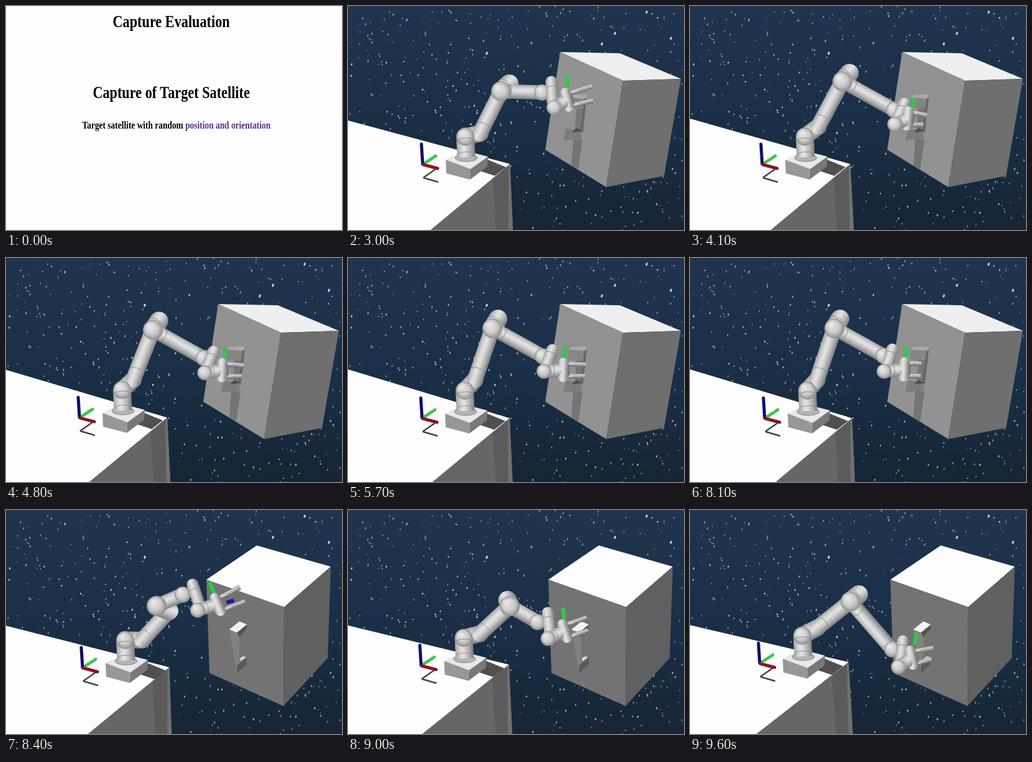
An HTML page with a canvas that plays this animation: 540 by 360 pixels, repeating every 9700 ms.

```html
<!DOCTYPE html>
<html lang="en">
<head>
<meta charset="utf-8">
<title>Capture Evaluation</title>
<style>
html, body { margin: 0; width: 100%; height: 100%; overflow: hidden; background: #fefefe; }
canvas, svg { position: absolute; left: 0; top: 0; width: 540px; height: 360px; display: block; }
text { font: bold 26.4px "Liberation Serif", "Times New Roman", serif; text-anchor: middle; }
.small { font-size: 15.9px; }
</style>
</head>
<body>
<canvas id="stage" width="540" height="360"></canvas>
<svg id="slide" viewBox="0 0 640 360" preserveAspectRatio="none">
  <rect width="640" height="360" fill="#fefefe"/>
  <rect x=".5" y=".5" width="639" height="359" fill="none" stroke="#ececec"/>
  <text x="314.8" y="34">Capture Evaluation</text>
  <text x="314.8" y="148">Capture of Target Satellite</text>
  <text class="small" x="324.6" y="197">Target satellite with random <tspan fill="#5b2c91">position and orientation</tspan></text>
</svg>
<script>
const LOOP = 9700, STEP = 100, INTRO = 3000, CUT = 8400;
const slide = document.getElementById('slide');
const ctx = document.getElementById('stage').getContext('2d');

// Joint positions; base is the platform drift, rim its left edge and bottom corner.
const ready = {
  base: [0, 0], rim: [184, 133], side: [212, 205], elbow: [246, 137], cap: [259, 125],
  wrist: [312, 139], w2a: [327, 122], w2b: [329, 154], w3: [331, 163],
  grip: [354, 150], tipA: [392, 129], tipB: [394, 152], marker: [352, 112]
};
const reach = {
  base: [-4, 0], rim: [181, 130], side: [206, 194], elbow: [245, 121], cap: [256, 108],
  wrist: [328, 167], w2a: [344, 157], w2b: [334, 180], w3: [329, 190],
  grip: [352, 181], tipA: [381, 176], tipB: [375, 191], marker: [360, 149]
};
const hold = {
  base: [-1, 3], rim: [179, 136], side: [204, 196], elbow: [232, 113], cap: [241, 98],
  wrist: [313, 158], w2a: [328, 148], w2b: [320, 169], w3: [315, 182],
  grip: [348, 180], tipA: [383, 172], tipB: [381, 190], marker: [349, 143]
};
const close = {
  ...hold, base: [0, 3], rim: [179, 138], wrist: [311, 157], w2a: [325, 147], w2b: [318, 169],
  w3: [312, 182], grip: [346, 179], tipA: [372, 170], tipB: [371, 190], marker: [348, 142]
};
const swing = {
  base: [3, -1], rim: [186, 132], side: [219, 209], elbow: [262, 162], cap: [242, 154],
  wrist: [284, 136], w2a: [300, 120], w2b: [310, 150], w3: [308, 161],
  grip: [342, 151], tipA: [376, 124], tipB: [384, 147], marker: [327, 116]
};
const lower = {
  base: [-8, -8], rim: [185, 107], side: [205, 189], elbow: [258, 147], cap: [271, 136],
  wrist: [325, 224], w2a: [342, 211], w2b: [339, 240], w3: [335, 252],
  grip: [358, 237], tipA: [391, 222], tipB: [388, 240], marker: [364, 198]
};

const linear = p => p;
const easeOut = p => 1 - (1 - p) ** 2;
const track = [
  [3000, ready, linear], [4100, reach, easeOut], [5700, hold, linear],
  [7200, close, linear], [CUT, close], [CUT, swing, linear], [9600, lower, linear], [LOOP, lower]
];

function poseAt(t) {
  let i = 0;
  while (i < track.length - 2 && t >= track[i + 1][0]) i++;
  const [t0, a, ease] = track[i], [t1, b] = track[i + 1];
  const p = ease(Math.min(1, (t - t0) / (t1 - t0)));
  const pose = {};
  for (const k in a) pose[k] = a[k].map((v, n) => v + (b[k][n] - v) * p);
  return pose;
}

function poly(color, ...pts) {
  ctx.fillStyle = color;
  ctx.beginPath();
  pts.forEach(([x, y]) => ctx.lineTo(x, y));
  ctx.closePath();
  ctx.fill();
}

function line(color, width, a, b, cap = 'round') {
  ctx.strokeStyle = color;
  ctx.lineWidth = width;
  ctx.lineCap = cap;
  ctx.beginPath();
  ctx.moveTo(...a);
  ctx.lineTo(...b);
  ctx.stroke();
}

const mix = (a, b, p) => [a[0] + (b[0] - a[0]) * p, a[1] + (b[1] - a[1]) * p];

// Unit normal of a segment, facing the light at the upper left.
function normal(a, b) {
  const dx = b[0] - a[0], dy = b[1] - a[1], len = Math.hypot(dx, dy) || 1;
  const s = dx - dy * 1.2 > 0 ? 1 : -1;
  return [s * dy / len, -s * dx / len];
}

function tube(a, b, width, cap) {
  const [nx, ny] = normal(a, b), r = width / 2;
  const g = ctx.createLinearGradient(a[0] + nx * r, a[1] + ny * r, a[0] - nx * r, a[1] - ny * r);
  [[0, '#a4a4a4'], [.25, '#d6d6d6'], [.42, '#e4e4e4'], [.7, '#bababa'], [1, '#7c7c7c']]
    .forEach(s => g.addColorStop(...s));
  line(g, width, a, b, cap);
}

// Thin seam across a tube.
function seam(a, b, p, width) {
  const [x, y] = mix(a, b, p);
  ctx.strokeStyle = '#8b8b8b';
  ctx.lineWidth = 1;
  ctx.beginPath();
  ctx.ellipse(x, y, width * .16, width / 2 - .5, Math.atan2(b[1] - a[1], b[0] - a[0]), -1.57, 1.57);
  ctx.stroke();
}

function ball([x, y], r) {
  const g = ctx.createRadialGradient(x - r * .35, y - r * .4, r * .1, x, y, r);
  g.addColorStop(0, '#e8e8e8');
  g.addColorStop(.6, '#cacaca');
  g.addColorStop(1, '#8d8d8d');
  ctx.fillStyle = g;
  ctx.beginPath();
  ctx.arc(x, y, r, 0, 7);
  ctx.fill();
}

function rng(seed) {
  return () => (seed = (seed * 16807) % 2147483647) / 2147483647;
}

function sky() {
  const g = ctx.createLinearGradient(0, 0, 0, 360);
  g.addColorStop(0, '#20344e');
  g.addColorStop(.5, '#1a2f47');
  g.addColorStop(1, '#152534');
  ctx.fillStyle = g;
  ctx.fillRect(0, 0, 540, 360);
  const rand = rng(4711);
  const star = (x, y, r, alpha) => {
    ctx.fillStyle = `rgba(222,232,238,${alpha})`;
    ctx.beginPath();
    ctx.ellipse(x, y, r * .8, r * 1.3, .35, 0, 7);
    ctx.fill();
  };
  for (let i = 0; i < 520; i++) {
    star(rand() * 540, rand() * 360, .7 + rand() * .7, .45 + rand() * .5);
  }
  [[429, 44], [408, 61], [519, 52], [480, 10], [223, 76]].forEach(([x, y]) => star(x, y, 2, .9));
}

function firstTarget() {
  poly('#efefef', [341, 74], [437, 76], [535, 117], [442, 120]);
  poly('#929292', [341, 74], [442, 120], [415, 291], [317, 231]);
  poly('#6f6f6f', [442, 120], [535, 117], [508, 273], [415, 291]);
  poly('#747474', [362, 214], [377, 214], [370, 263], [359, 256]);
  poly('#777', [367, 160], [383, 150], [378, 204], [365, 200]);
  poly('#858585', [355, 147], [380, 149], [378, 165], [353, 163]);
  poly('#a9a9a9', [355, 147], [359, 143], [382, 142], [384, 147], [380, 149]);
  poly('#666', [380, 149], [384, 147], [377, 201], [373, 203]);
  poly('#7c7c7c', [350, 197], [376, 200], [375, 213], [346, 216]);
  poly('#4b4b4b', [360, 203], [367, 196], [377, 201]);
}

function secondTarget() {
  poly('#fdfdfd', [403, 57], [522, 91], [447, 156], [322, 112]);
  poly('#737373', [322, 112], [447, 156], [446, 315], [327, 262]);
  poly('#606060', [447, 156], [522, 91], [517, 238], [446, 315]);
  poly('#545454', [371, 197], [387, 184], [387, 191], [375, 204], [375, 241], [371, 250]);
  poly('#818181', [359, 192], [371, 197], [375, 204], [375, 240], [387, 234], [387, 247], [371, 262]);
  poly('#5a5a5a', [371, 250], [387, 236], [387, 248], [371, 262]);
  poly('#f3f3f3', [359, 192], [375, 179], [387, 184], [371, 197]);
  poly('#d8d8d8', [376, 238], [381, 235], [386, 237], [377, 243]);
}

function platform({ base: [dx, dy], rim: [left, bottom] }) {
  const cx = 260.5 + dx * .7, cy = 254 + dy * 1.2, foot = 265 + dx * .4;
  poly('#fefefe', [0, left], [cx, cy], [bottom, 360], [0, 360]);
  poly('#666', [cx, cy], [foot, 360], [bottom, 360]);
  poly('#5b5b5b', [cx - 27, cy + 23], [cx - 3, cy + 3], [foot - 3, 360], [foot - 27, 360]);
  poly('#707070', [cx - 3, cy + 3], [cx, cy], [foot, 360], [foot - 7, 360]);

  ctx.save();
  ctx.translate(dx, dy);
  poly('#505050', [222, 246], [254, 259], [236, 273], [212, 265]);
  line('#45453f', 2.5, [121, 276], [145, 283], 'butt');
  line('#45453f', 2.5, [121, 276], [141, 262], 'butt');
  line('#3ac84b', 5, [121, 254], [141, 241]);
  line('#10106e', 5, [118, 222], [120, 254]);
  line('#8e1226', 5, [121, 255], [144, 261]);
  poly('#e9e9e9', [157, 247], [186, 232], [225, 242], [197, 262]);
  poly('#979797', [157, 247], [197, 262], [196, 279], [158, 269]);
  poly('#787878', [197, 262], [225, 242], [224, 258], [196, 279]);
  ctx.restore();
}

function arm(p, flipped) {
  const [dx, dy] = p.base;
  const foot = [190 + dx, 243 + dy], shoulder = [188.5 + dx, 210 + dy];

  // Base flange, shoulder and upper arm
  ctx.fillStyle = '#b4b4b4';
  ctx.strokeStyle = '#858585';
  ctx.lineWidth = 1;
  ctx.beginPath();
  ctx.ellipse(foot[0], foot[1] + 1, 18, 6, 0, 0, 7);
  ctx.fill();
  ctx.stroke();
  tube(shoulder, p.side, 27);
  tube(p.side, p.elbow, 25);
  seam(p.side, p.elbow, .18, 25);
  tube(foot, shoulder, 29, 'butt');
  ball(shoulder, 14.5);
  seam(foot, shoulder, .8, 29);
  seam(foot, shoulder, .12, 29);

  // Elbow and forearm
  const start = flipped ? p.cap : p.elbow;
  tube(p.elbow, p.cap, 30);
  seam(p.elbow, p.cap, .75, 30);
  tube(start, p.wrist, 23);
  ball(start, 16);
  seam(start, p.wrist, .2, 24);
  seam(start, p.wrist, .86, 22);

  // Marker and fingers
  const reach = Math.hypot(p.grip[0] - p.marker[0], p.grip[1] - p.marker[1]);
  line('#2fc944', 6, p.marker, mix(p.marker, p.grip, 19 / reach), 'butt');
  if (flipped) line('#1a1a9c', 6, [p.grip[0] + 15, p.grip[1] - 3], [p.grip[0] + 22, p.grip[1] - 5]);
  const mid = mix(p.tipA, p.tipB, .5);
  const [nx, ny] = normal(p.grip, mid);
  [[p.tipA, 1], [p.tipB, -1]].forEach(([tip, s]) => {
    const root = [p.grip[0] + nx * 10 * s + 4, p.grip[1] + ny * 10 * s];
    line('#747474', 8, root, tip, 'butt');
    line('#c9c9c9', 5, [root[0], root[1] - 1], [tip[0], tip[1] - 1], 'butt');
    line('#8c8c8c', 1, mix(root, tip, .35), tip, 'butt');
  });

  // Wrist joints and gripper body
  ball(p.wrist, 13);
  tube(p.w2a, p.w2b, 19);
  seam(p.w2b, p.w2a, .7, 19);
  ctx.save();
  ctx.translate(...p.grip);
  ctx.rotate(Math.atan2(mid[1] - p.grip[1], mid[0] - p.grip[0]));
  tube([-2, -11], [-2, 11], 17);
  line('#8a8a8a', 1, [3, -14], [3, 14]);
  line('#777', 3, [7, -7], [7, 8]);
  ctx.restore();
  tube(p.w3, mix(p.w3, p.grip, .55), 21);
  ball(p.w3, 12);
  seam(p.w3, p.grip, .4, 21);
}

function render(t) {
  slide.style.display = t < INTRO ? 'block' : 'none';
  if (t < INTRO) return;
  const second = t >= CUT, pose = poseAt(t);
  sky();
  second ? secondTarget() : firstTarget();
  platform(pose);
  // The elbow faces the viewer at the start of the second run, then turns away.
  arm(pose, second && t < 8900);
}

const begin = performance.now();
function tick() {
  const t = (performance.now() - begin) % LOOP;
  render(Math.floor(t / STEP) * STEP);
  requestAnimationFrame(tick);
}
tick();
</script>
</body>
</html>
```
